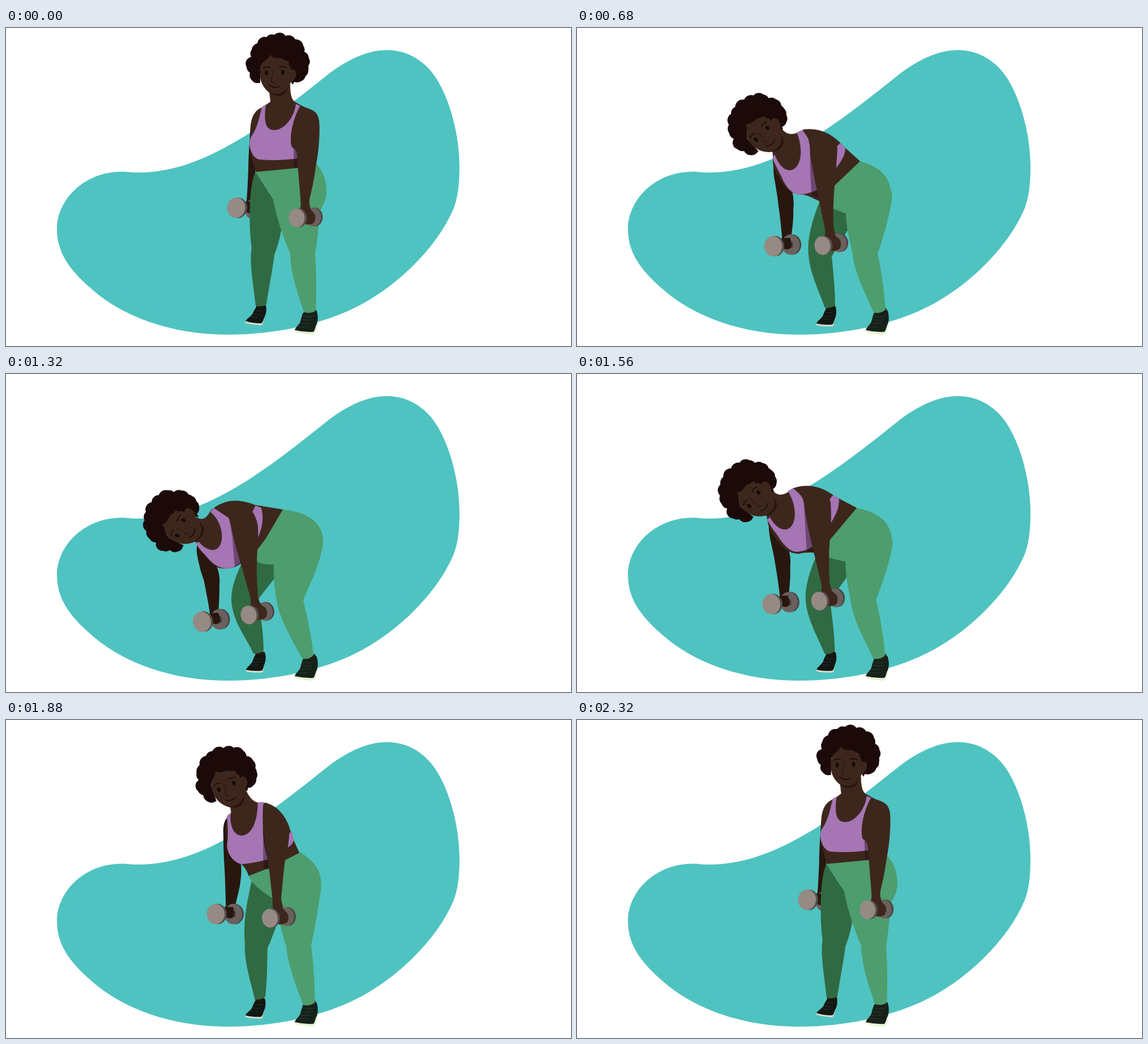
Write an HTML page that moves like this. It is 998 px wide and 561 px high and loops after 2.36 s.

```html
<!DOCTYPE html>
<html lang="en">
<head>
<meta charset="utf-8">
<title>Dumbbell deadlift</title>
<style>
html, body { margin: 0; width: 100%; height: 100%; overflow: hidden; background: #fff; }
svg { display: block; width: 100%; height: 100%; }
.line { fill: none; stroke-linecap: round; stroke-linejoin: round; }
</style>
</head>
<body>
<svg id="stage" viewBox="0 0 998 561" xmlns="http://www.w3.org/2000/svg">
  <path fill="#4fc3c1" d="M215 254C145 248 90 299 90 355C90 398 115 428 145 455C205 511 295 541 390 541C475 541 545 523 590 505C680 470 760 390 790 320C799 298 801 272 801 245C801 190 785 130 762 92C743 60 711 39 673 39C637 39 600 57 565 85C520 121 470 160 423 190C380 216 312 255 235 255C228 255 222 255 215 254Z"/>
</svg>
<script>
const LOOP = 2360, STEP = 40;
const SKIN = '#3d271c', SHADE = '#28170f', HAIR = '#1c0a0a', LILAC = '#a675b4';
const KEYS = [0, 0.218, 0.641, 0.973];   // bend amount of the four poses
const stage = document.getElementById('stage');
const tracks = [];

function add(tag, attrs, parent = stage) {
  const el = document.createElementNS(stage.namespaceURI, tag);
  for (const k in attrs) el.setAttribute(k, attrs[k]);
  return parent.appendChild(el);
}

// Smooth curve through the four pose values of one number
function curve(v) {
  const h = [], s = [];
  for (let i = 0; i < 3; i++) {
    h[i] = KEYS[i + 1] - KEYS[i];
    s[i] = (v[i + 1] - v[i]) / h[i];
  }
  const mid = i => (s[i - 1] * h[i] + s[i] * h[i - 1]) / (h[i] + h[i - 1]);
  const m = [0, mid(1), mid(2), 0];
  m[0] = 2 * s[0] - m[1];
  m[3] = 2 * s[2] - m[2];
  return p => {
    if (p >= KEYS[3]) return v[3] + m[3] * (p - KEYS[3]);
    const i = p < KEYS[1] ? 0 : p < KEYS[2] ? 1 : 2;
    const x = (p - KEYS[i]) / h[i], y = 1 - x;
    return v[i] * y * y * (1 + 2 * x) + v[i + 1] * x * x * (3 - 2 * x)
         + h[i] * x * y * (m[i] * y - m[i + 1] * x);
  };
}

// Blend an attribute between four strings that differ only in their numbers
function morph(el, attr, poses) {
  const num = /-?\d+(?:\.\d+)?/g;
  const words = poses[0].split(num);
  const rows = poses.map(d => d.match(num).map(Number));
  const curves = rows[0].map((_, i) => curve(rows.map(r => r[i])));
  tracks.push(p => el.setAttribute(attr,
    words.reduce((out, w, i) => out + curves[i - 1](p).toFixed(2) + w)));
}

const shape = (fill, ...poses) => morph(add('path', { fill }), 'd', poses);

// Each place is [x, y, angle]
function group(...places) {
  const g = add('g', {});
  morph(g, 'transform', places.map(([x, y, a]) => `translate(${x} ${y}) rotate(${a})`));
  return g;
}

const fill = (g, color, d) => add('path', { fill: color, d }, g);
const line = (g, stroke, width, d) =>
  add('path', { class: 'line', stroke, 'stroke-width': width, d }, g);

function dumbbell(g, rx, ry, gap, skin, hand) {
  const plate = (cx, color) => add('ellipse', { cx, cy: 0, rx, ry, fill: color }, g);
  plate(gap + 1, '#4b4341');
  plate(gap - 2, '#6a615f');
  add('rect', { x: 4, y: -5, width: gap - 2, height: 10, fill: '#433a37' }, g);
  fill(g, skin, hand);
  plate(3.8, '#584e4c');
  plate(0, '#958a84');
}

// Far arm
shape(SHADE,
  'M446 148C432 155 432 170 431 190C429 215 428 235 428 250C427 275 426 295 424 318L434 320C435 300 437 280 440 256C444 225 445 180 446 148Z',
  'M413 154C402 162 402 175 402 190C401 215 401 235 402 255C402 275 402 295 402 322L416 324C418 308 425 290 428 265C432 230 420 190 413 154Z',
  'M348 232C346 242 347 252 348 262C351 280 354 295 356 315C359 335 361 355 363 378L377 380C379 362 383 340 382 320C386 290 372 255 348 232Z',
  'M338 300C335 310 338 322 341 335C344 350 348 358 350 366C354 388 358 405 361 428L374 430C376 412 377 395 377 372C380 345 365 315 338 300Z');
dumbbell(group([406.5, 317, 5], [383.5, 329, 2], [346.5, 385, -5], [346, 437, -8]),
  15.8, 18, 33, SHADE, 'M16 -13L31 -12Q34 0 31 6Q23 10 16 4Z');

// Far shoe
const farShoe = group([455, 522, 0], [455, 524, -2], [455, 524, -4], [456, 524, -5]);
fill(farShoe, SHADE, 'M-13 -34L3 -34L2 -25L-13 -25Z');
fill(farShoe, '#d9dccb', 'M-33 -5Q-18 0 -3 -3L1 -13L-2 1Q-4 3 -9 2Q-24 1 -32 -2Z');
fill(farShoe, '#121713', 'M-13 -30Q-4 -27 4 -33C6 -24 4 -16 1 -11C-1 -6 -2 -1 -5 -1Q-20 -1 -32 -5C-29 -10 -24 -12 -20 -17Q-17 -24 -13 -30Z');
line(farShoe, '#29302b', 1, 'M-15 -24Q-8 -21 -2 -23M-18 -18Q-11 -15 -5 -17M-22 -13Q-15 -10 -9 -12');

// Far leg
shape('#306a43',
  'M441 254C430 270 428 345 434 388C429 410 438 460 441 490Q450 493 460 488C464 460 472 420 474 400C480 385 484 370 487 352L472 302Z',
  'M436 274C428 310 423 350 427 391C424 425 436 465 440 492Q450 494 459 488C463 460 466 425 467 402C473 388 478 370 483 352L475 312Z',
  'M429 305C417 335 406 370 409 400C411 432 429 468 438 494Q448 495 456 489C456 460 452 425 450 403C459 388 468 372 478 357L475 322Z',
  'M418 330C407 355 395 380 399 408C403 440 427 470 437 493Q447 495 455 488C455 460 450 425 445 398C453 388 462 376 474 361L473 330Z');

// Near shoe
const shoe = add('g', {});
fill(shoe, '#2e1b13', 'M526 498L546 494L548 503L526 506Z');
fill(shoe, '#e6f5d3', 'M509 533Q528 537 544 534Q547 526 551 519Q551 528 547 536Q546 541 540 541Q520 540 509 536Z');
fill(shoe, '#16211a', 'M525 502Q538 507 548 497C552 507 551 517 549 522C546 528 546 533 543 536Q526 537 510 533C511 528 517 525 520 518Q522 509 525 502Z');
line(shoe, '#303c33', 1, 'M524 508Q533 511 544 508M523 514Q531 517 541 514M519 521Q528 523 537 520M516 526Q524 529 533 526');

// Hips and near leg
shape('#4d9d6e',
  'M441 254C455 274 464 288 472 302C477 332 488 365 502 398C502 430 515 468 526 501Q537 505 547 499C549 465 548 425 546 398C551 370 552 345 555 322C562 310 566 300 566 288C566 265 557 248 547 238Q540 244 516 247Q480 250 441 254Z',
  'M432 264C440 285 460 300 475 312C479 340 488 372 498 398C500 432 514 470 525 502Q536 506 546 499C547 465 545 425 542 398C547 370 550 345 555 310C558 302 559 295 559 284C559 262 545 247 530 234Q510 242 484 251Q460 257 432 264Z',
  'M427 305C437 312 455 321 475 327C475 350 482 375 487 400C490 432 510 470 524 502Q535 505 545 497C543 465 537 425 531 398C541 370 551 335 556 305C557 298 557 292 554 284C549 255 525 242 500 235Q472 251 456 275Q438 287 427 305Z',
  'M438 318C440 334 450 336 473 336C472 355 474 375 478 400C483 432 506 470 523 502Q535 505 543 496C541 470 533 430 525 399C535 375 550 345 557 315C559 308 560 300 560 290C557 260 530 243 489 239Q469 262 457 290Q446 302 438 318Z');

// Torso and neck
shape(SKIN,
  'M465 112L467 130Q455 139 448 142C432 152 432 170 432 190C428 225 440 240 441 254L516 247L547 238L548 150Q520 136 510 130Q502 125 502 100Z',
  'M421 128L424 144Q417 150 413 154C402 165 402 180 405 200C402 230 428 240 432 264L484 252L528 235L521 195Q512 150 482 137Q462 138 453 105Z',
  'M345 212L346 228Q345 240 349 250C360 270 370 290 392 294C405 293 415 300 427 305L456 277L500 235L470 208Q440 174 400 179Q372 198 358 172Z',
  'M328 285L336 298Q340 310 352 320C365 340 375 344 392 343C405 342 414 336 438 318L459 290L489 239L440 231Q395 212 362 240Q350 263 337 252Z');

// Top
shape(LILAC,
  'M452 139L459 135C455 165 458 180 474 180C493 180 510 155 512 134L521 138C508 165 500 195 505 210Q510 214 515 215L515 230Q480 235 447 232C433 228 426 205 433 192C442 180 446 165 452 139Z',
  'M413 152L421 146C416 170 422 190 438 190C456 189 468 165 471 136L481 137C474 160 472 180 474 200Q476 210 478 218L482 235Q450 242 428 242C411 238 402 218 406 204C412 190 413 170 413 152Z',
  'M345 229L349 223C356 240 364 251 377 251C396 248 401 215 388 184L398 180C406 190 413 200 412 215Q413 235 418 255L424 286Q408 293 392 294C378 293 366 275 362 264C356 252 350 242 345 229Z',
  'M335 298L341 296C350 308 365 314 373 308C387 298 384 262 361 243L367 236C378 244 388 250 395 255Q400 280 405 300L414 333Q403 343 389 343C375 342 365 334 357 325C350 317 342 310 335 298Z');
shape(LILAC,
  'M535 190Q536 189 537 189L544 195Q546 205 538 215Q538 205 535 190Z',
  'M517 197Q518 195 520 194L523 206Q525 214 516 219Q517 210 517 197Z',
  'M456 214Q460 207 465 203L474 212Q474 228 455 250Q457 232 456 214Z',
  'M435 244Q438 237 441 232L451 236Q458 262 444 291Q449 262 435 244Z');
shape('rgba(28,8,22,.42)',
  'M513 195L508 214L509 246L517 246Z',
  'M476 190L475 220L475 254L484 252Z',
  'M411 205L412 250L414 293L428 303Z',
  'M394 252L400 290L404 341L416 334Z');

// Near arm
shape(SKIN,
  'M519 138C505 165 500 195 505 209Q513 214 514 225L520 300C521 308 520 315 521 322L538 318C535 310 536 305 536 302C542 280 545 260 548 240C553 215 555 180 553 163C551 150 545 143 519 138Z',
  'M481 139C474 160 472 185 476 200Q480 215 482 225L488 300C489 308 488 316 490 325L507 320C504 312 504 308 504 303C508 280 510 260 513 240C518 225 521 200 520 188C515 165 500 145 481 139Z',
  'M408 190C410 202 412 210 412 222Q415 245 420 268L437 350C439 356 438 362 439 372L458 366C454 358 453 352 453 348C452 325 453 300 455 278C457 262 459 230 460 212C452 195 430 186 408 190Z',
  'M392 248C396 262 398 272 402 285Q407 310 412 325L431 392C433 398 432 402 433 412L450 406C447 400 445 396 445 391C443 365 442 340 444 310C447 295 446 262 437 245C425 235 405 236 392 248Z');
dumbbell(group([513.5, 335, -3], [483.5, 340, -4], [433.5, 384, -10], [428.5, 425, -12]),
  14, 16.5, 31, SKIN, 'M7 -19L23 -20Q25 -12 31 -7Q34 3 30 10Q23 14 14 12Z');

// Head, drawn upright around the point between the eyes
const pivot = group([474.5, 78.5, 0], [421, 95.5, -12], [326, 186.5, -44], [307.5, 271, -65]);
const head = add('g', { transform: 'translate(-474.5 -78.5)' }, pivot);
const curls = [[447, 97], [434, 92], [431, 79], [425, 69], [426, 55], [433, 51], [434, 38],
  [444, 27], [460, 16], [474, 12], [494, 14], [511, 20], [525, 31], [527, 42], [535, 53],
  [534, 67], [534, 74], [529, 85], [521, 94], [509, 95], [506, 100]];
fill(head, HAIR, 'M449 97' + curls.map(([x, y]) => `A13 13 0 0 1 ${x} ${y}`).join('') + 'L502 92L450 66Z');
fill(head, SKIN, 'M450 68C447 80 449 92 453 100C459 111 469 119 480 119C491 119 499 109 503 96C510 92 514 84 512 77Q509 71 503 74Q503 66 499 65Q502 58 493 57Q488 53 481 53Q470 53 467 47Q463 54 457 58Q451 62 450 68Z');
fill(head, SHADE, 'M463 112C474 123 495 126 499 102C494 113 482 121 463 112Z');
for (const [cx, cy] of [[460, 79.3], [489, 78.3]])
  add('ellipse', { cx, cy, rx: 2.9, ry: 4.3, fill: '#120c09' }, head);
line(head, HAIR, 1.8, 'M455 70.5Q460 67 466 69.5M483 69Q489 66.5 495 70');
line(head, SHADE, 1.3, 'M471.5 73Q472 85 468 92Q469 96 474 95.5');
line(head, '#170c08', 1.6, 'M465 100.5Q474 108 484 102.5');

const soft = x => x * x * (3 - 2 * x);
const firm = x => x * x * x * (10 - 15 * x + 6 * x * x);

// Going down starts and stops firmly, coming up is a little softer
function bend(t) {
  const half = LOOP / 2;
  if (t < half) return firm(t / half);
  const x = (LOOP - t) / half;
  return (soft(x) + firm(x)) / 2;
}

const start = performance.now();
function draw(now) {
  const t = Math.floor(Math.max(0, now - start) % LOOP / STEP) * STEP;
  const p = bend(t);
  tracks.forEach(set => set(p));
  requestAnimationFrame(draw);
}
draw(start);
</script>
</body>
</html>
```
